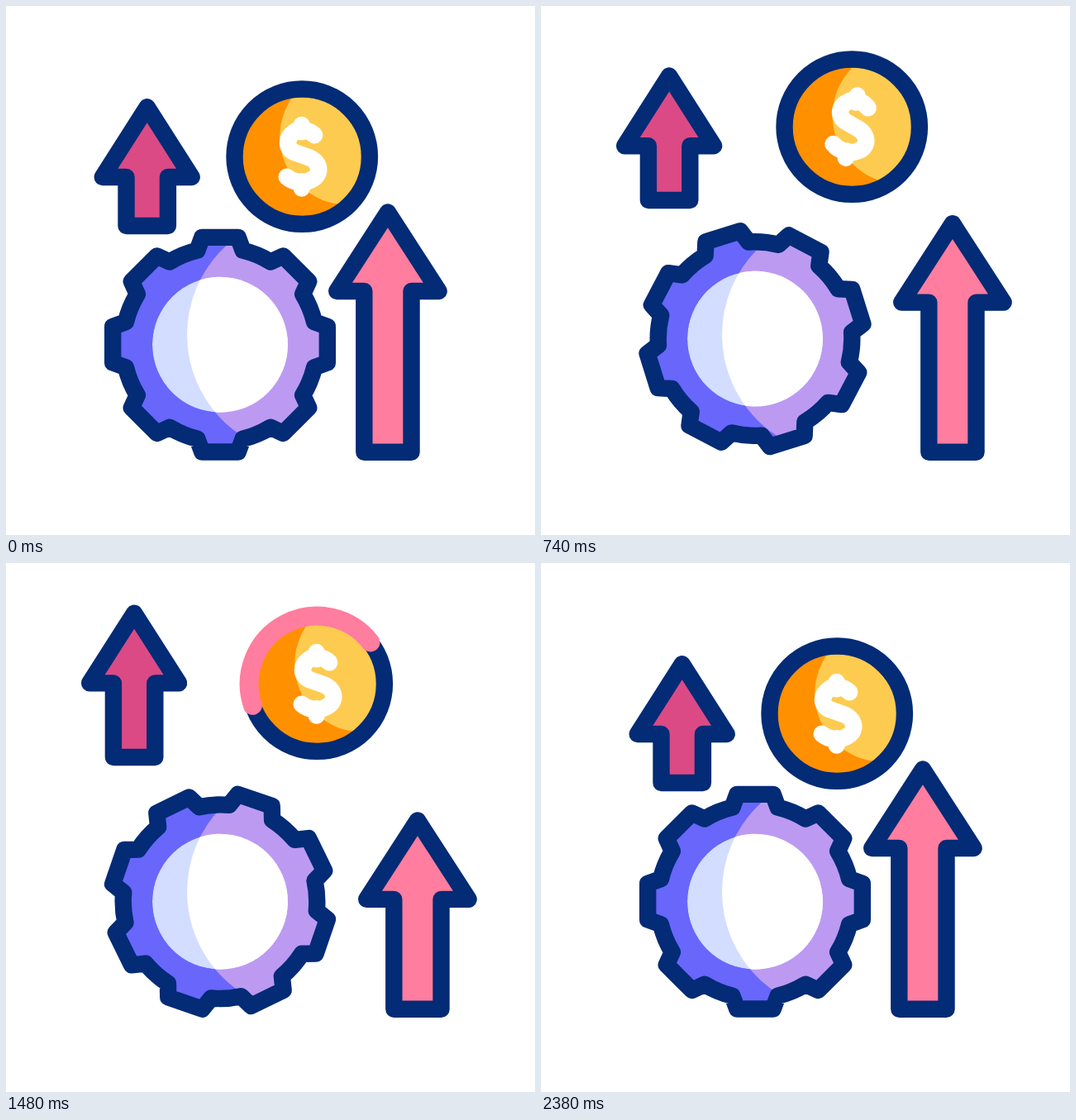
An HTML page for the animation above (2400 ms loop, 640 by 640 pixels).

```html
<!DOCTYPE html>
<html lang="en">
<head>
<meta charset="utf-8">
<title>Growth icon</title>
<style>
  html, body { margin: 0; width: 100%; height: 100%; overflow: hidden; background: #fff; }
  svg { display: block; width: 100%; height: 100%; }
  .line { stroke: #032b76; stroke-width: 20.4; stroke-linejoin: round; }
  .round { fill: none; stroke-linecap: round; stroke-linejoin: round; }
</style>
</head>
<body>
<svg viewBox="0 0 640 640">
  <defs>
    <clipPath id="gearClip"><path id="gearCut"/></clipPath>
    <clipPath id="holeClip"><circle r="82"/></clipPath>
    <clipPath id="coinClip"><circle r="78"/></clipPath>
  </defs>

  <g id="gear">
    <g clip-path="url(#gearClip)">
      <rect x="-150" y="-150" width="300" height="300" fill="#6966fb"/>
      <circle class="shade" cx="106" r="146" fill="#bc9af2"/>
    </g>
    <g clip-path="url(#holeClip)">
      <circle r="82" fill="#d2ddff"/>
      <circle class="shade" cx="106" r="146" fill="#fff"/>
    </g>
    <path id="gearLine" class="line" fill="none"/>
  </g>

  <path id="leftArrow" class="line" fill="#db4a85"/>
  <path id="rightArrow" class="line" fill="#ff7d9e"/>

  <g id="coin">
    <g id="coinFace">
      <g clip-path="url(#coinClip)">
        <circle r="78" fill="#ff9000"/>
        <circle cx="55.5" cy="-24" r="82.5" fill="#fdcb50"/>
      </g>
      <path class="round" stroke="#fff" stroke-width="20.5"
        d="M15-26C8-33-3-34-9-30C-20-23-20-10-9-5L8 1C22 6 24 21 13 27C4 33-10 32-18.5 24.5M-.5-30V-38.3M-.5 30V38.3"/>
    </g>
    <circle r="81.7" class="line" fill="none"/>
    <path id="sweep" class="round" stroke="#ff7d9e" stroke-width="23"/>
  </g>

  <path id="rays" class="round" stroke="#fdcb50" stroke-width="20"/>
</svg>

<script>
const LOOP = 2400;
const $ = id => document.getElementById(id);
const mix = (a, b, k) => a + (b - a) * k;
const part = (t, from, to) => Math.min(1, Math.max(0, (t - from) / (to - from)));
const smooth = x => x * x * (3 - 2 * x);

// cubic-bezier(.333, 0, .833, 1), solved by bisection
function late(x) {
  let lo = 0, hi = 1;
  for (let i = 0; i < 24; i++) {
    const s = (lo + hi) / 2, r = 1 - s;
    if (s * r * r + 2.5 * s * s * r + s * s * s < x) lo = s; else hi = s;
  }
  return smooth(lo);
}

// value at t from [time, value] steps, eased between them
function track(t, steps) {
  if (t <= steps[0][0]) return steps[0][1];
  for (let i = 1; i < steps.length; i++) {
    const [t0, a] = steps[i - 1], [t1, b] = steps[i];
    if (t < t1) return mix(a, b, smooth(part(t, t0, t1)));
  }
  return steps[steps.length - 1][1];
}

const polar = (r, deg) => {
  const a = deg * Math.PI / 180;
  return [r * Math.cos(a), r * Math.sin(a)];
};
const pt = p => p.map(v => v.toFixed(2)).join(' ');

function gearPath() {
  const body = 117.3, base = 13.6;
  const tip = Math.hypot(21.8, 129.8), spread = Math.atan2(21.8, 129.8) * 180 / Math.PI;
  const arc = `A${body} ${body} 0 0 1 `;
  let d = '';
  for (let i = 0; i < 8; i++) {
    const a = i * 45 - 90;
    d += (i ? arc : 'M') + pt(polar(body, a - base));
    d += 'L' + pt(polar(tip, a - spread)) + 'L' + pt(polar(tip, a + spread));
    d += 'L' + pt(polar(body, a + base));
  }
  return d + arc + pt(polar(body, -90 - base)) + 'Z';
}

// tip and wings rise by "lift"; the foot stays
function arrowPath(s, dx, dy, lift) {
  const x = s.x + dx, tip = s.tip + dy - lift, wing = s.wing + dy - lift;
  return `M${x} ${tip}L${x + s.span} ${wing}H${x + s.shaft}V${s.foot + dy}` +
         `H${x - s.shaft}V${wing}H${x - s.span}Z`;
}

const left = { x: 170.7, tip: 122.3, wing: 207, foot: 266, span: 54, shaft: 25.2 };
const right = { x: 461.9, tip: 249.5, wing: 345, foot: 539.8, span: 61.7, shaft: 28.6 };

// outer end and inner end of each spark
const sparks = [[452.3, 52, 441.2, 81], [495, 90, 467, 104]];

function draw(t) {
  const out = track(t, [[200, 0], [600, 1], [1800, 1], [2200, 0]]);
  const grow = t < 1200 ? late(part(t, 600, 1200)) : 1 - smooth(part(t, 1200, 1800));

  $('leftArrow').setAttribute('d', arrowPath(left, -15.6 * out, -31 * out, 56 * grow));
  $('rightArrow').setAttribute('d', arrowPath(right, 36 * out, 0, -113 * grow));

  // the gear hops and turns while its shading stays put
  const turn = `rotate(${180 * late(part(t, 200, 2200))})`;
  const hop = track(t, [[600, 0], [800, -9], [1000, 0]]);
  $('gear').setAttribute('transform', `translate(259 ${409.7 + hop})`);
  $('gearCut').setAttribute('transform', turn);
  $('gearLine').setAttribute('transform', turn);
  for (const c of shades) c.setAttribute('cy', -12 - hop);

  const tilt = track(t, [[200, 0], [400, 18], [600, -18], [800, 18], [1000, 0]]);
  $('coin').setAttribute('transform', `translate(${358.2 + 18 * out} ${182.2 - 36 * out})`);
  $('coinFace').setAttribute('transform', `rotate(${tilt})`);

  // pink band runs once round the rim, anticlockwise
  let d = '';
  if (t > 1000 && t < 2200) {
    const head = -359.9 * smooth(part(t, 1000, 1900));
    const tail = -359.9 * smooth(part(t, 1300, 2200));
    d = `M${pt(polar(82, tail))}A82 82 0 ${tail - head > 180 ? 1 : 0} 0 ${pt(polar(82, head))}`;
  }
  $('sweep').setAttribute('d', d);

  d = '';
  if (t > 1950 && t < 2380) {
    const head = smooth(part(t, 1950, 2200));
    const tail = Math.min(head, smooth(part(t, 2100, 2380)));
    for (const [x1, y1, x0, y0] of sparks) {
      const at = k => pt([mix(x0, x1, k), mix(y0, y1, k)]);
      d += `M${at(tail)}L${at(head)}`;
    }
  }
  $('rays').setAttribute('d', d);
}

const shades = document.querySelectorAll('.shade');
const cog = gearPath();
$('gearCut').setAttribute('d', cog);
$('gearLine').setAttribute('d', cog);

const start = performance.now();
function tick() {
  draw((performance.now() - start) % LOOP);
  requestAnimationFrame(tick);
}
tick();
</script>
</body>
</html>
```
